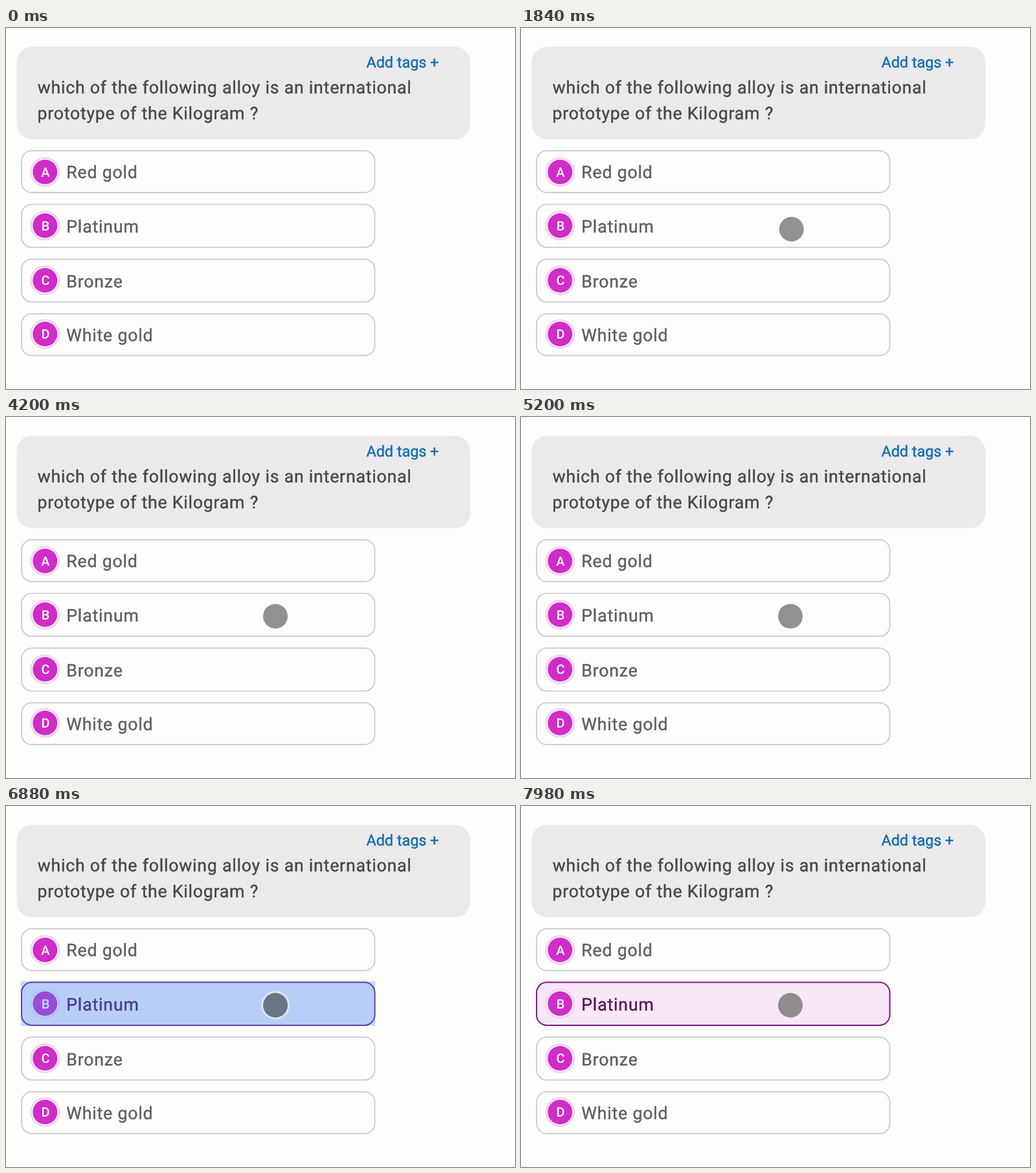
An HTML page for the animation above (8000 ms loop, 786 by 558 pixels).

```html
<!DOCTYPE html>
<html lang="en">
<head>
<meta charset="utf-8">
<title>Quiz</title>
<style>
  html, body { margin: 0; width: 100%; height: 100%; overflow: hidden; background: #fdfdfc; }
  svg { display: block; width: 786px; height: 558px; font-family: Roboto, sans-serif; }
  text { text-rendering: geometricPrecision; stroke-width: .4px; }
  .question { font-size: 26.67px; letter-spacing: .79px; fill: #48464a; stroke: #48464a; }
  .tags { font-size: 23.33px; fill: #0d6cb4; stroke: #0d6cb4; }
  .card { fill: #fdfdfc; stroke: #c5c4c8; stroke-width: 1.6; }
  .label { font-size: 26.67px; letter-spacing: .83px; fill: #5e5d61; stroke: #5e5d61; }
  .halo { fill: #fdf8fd; stroke: #f5d0f1; stroke-width: 2.5; }
  .badge { fill: #d02cc8; }
  .letter { font-size: 20px; font-weight: 500; fill: #fff; text-anchor: middle; }
  .selected .card { fill: #f8e7f6; stroke: #85178b; stroke-width: 2; }
  .selected .label { fill: #561460; stroke: #561460; }
</style>
</head>
<body>
<svg viewBox="0 0 786 558">
  <defs><clipPath id="rippleBox"><rect x="23" y="271" width="547" height="69"/></clipPath></defs>
  <rect width="786" height="558" fill="#fdfdfc"/>
  <rect x="16.5" y="29" width="700.5" height="143" rx="24" fill="#ebe9ea"/>
  <text class="tags" x="556.5" y="61">Add tags +</text>
  <text class="question" x="48.7" y="101">which of the following alloy is an international</text>
  <text class="question" x="48.4" y="141">prototype of the Kilogram ?</text>
  <g id="options"></g>
  <g clip-path="url(#rippleBox)"><circle id="ripple" cx="416" cy="308" fill="#2196f3"/></g>
  <g id="pointer">
    <circle id="ring" r="22" fill="#e0e5f2"/>
    <circle id="dot" r="19"/>
  </g>
</svg>
<script>
  const LOOP = 8000;
  const ENTER = 160, TRAVEL = 2160;
  const PRESS = 6560, GROW = 300, FADE = 7060, FADE_TIME = 300;
  const from = { x: 575, y: 577 }, rest = { x: 416, y: 308 };
  const idleColor = [104, 104, 105], pressColor = [60, 76, 92];

  // label, card top, card height, badge centre, text baseline
  const rows = [
    ['Red gold', 189.8, 64.6, 222.5, 232],
    ['Platinum', 272.5, 66.5, 305.5, 316],
    ['Bronze', 357.3, 66.2, 390, 401],
    ['White gold', 441.8, 64.6, 473, 484],
  ];

  const find = id => document.getElementById(id);
  const clamp = v => Math.min(1, Math.max(0, v));
  const easeOut = v => 1 - (1 - v) ** 3;
  const mix = (a, b, k) => a + (b - a) * k;

  find('options').innerHTML = rows.map(([label, top, height, mid, base], i) => `
    <g>
      <rect class="card" x="24" y="${top}" width="545.5" height="${height}" rx="16"/>
      <circle class="halo" cx="60.3" cy="${mid}" r="21.7"/>
      <circle class="badge" cx="60.3" cy="${mid}" r="19"/>
      <text class="letter" x="61" y="${mid + 7.3}">${'ABCD'[i]}</text>
      <text class="label" x="93.2" y="${base}">${label}</text>
    </g>`).join('');

  const choice = find('options').children[1];
  const ripple = find('ripple'), pointer = find('pointer');
  const ring = find('ring'), dot = find('dot');

  function draw(t) {
    const k = easeOut(clamp((t - ENTER) / TRAVEL));
    pointer.setAttribute('transform',
      `translate(${mix(from.x, rest.x, k)} ${mix(from.y, rest.y, k)})`);
    pointer.style.display = t < ENTER ? 'none' : '';

    const pressed = t >= PRESS;
    const press = pressed ? 1 - clamp((t - FADE) / FADE_TIME) : 0;
    choice.classList.toggle('selected', pressed);
    ripple.setAttribute('r', pressed ? 410 * easeOut(clamp((t - PRESS) / GROW)) : 0);
    ripple.setAttribute('opacity', .3 * press);
    ring.setAttribute('opacity', press);
    const color = idleColor.map((c, i) => mix(c, pressColor[i], press));
    dot.setAttribute('fill', `rgba(${color},.72)`);
  }

  function frame() {
    draw(performance.now() % LOOP);
    requestAnimationFrame(frame);
  }
  frame();
</script>
</body>
</html>
```
